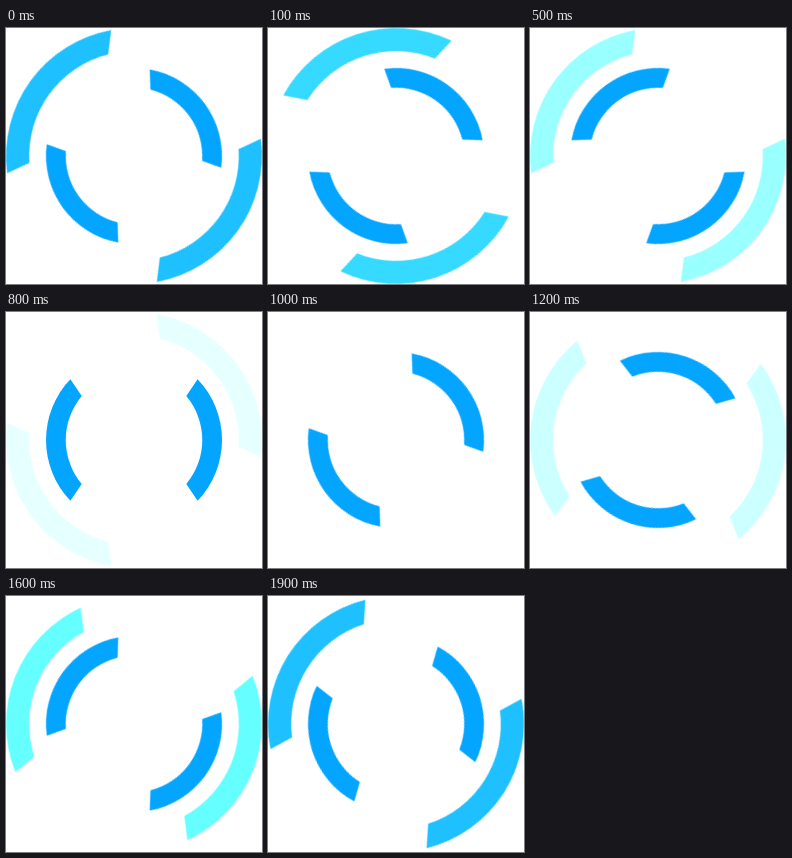
An HTML page without scripts for the animation above (2000 ms loop, 256 px wide and 256 px high).

```html
<!DOCTYPE html>
<html lang="en">
<head>
<meta charset="utf-8">
<title>Loading rings</title>
<style>
  html, body { margin: 0; height: 100%; overflow: hidden; background: #fff; }
  svg { display: block; width: 100%; height: 100%; }

  /* Ten discrete poses per second */
  .outer { animation: whirl 2s infinite, fade 2s infinite; }
  .inner { fill: #04a5ff; animation: spin 2s steps(20) infinite; }

  @keyframes spin {
    from { transform: rotate(-36deg); }
    to   { transform: rotate(-396deg); }
  }

  /* Fast sweep, then a slow drift */
  @keyframes whirl {
    0%   { transform: rotate(36deg); animation-timing-function: steps(9); }
    45%  { transform: rotate(360deg); animation-timing-function: steps(1); }
    50%  { transform: rotate(0deg); animation-timing-function: steps(10); }
    100% { transform: rotate(36deg); }
  }

  /* Brighten to white and back */
  @keyframes fade {
    0%   { fill: #1ec0ff; animation-timing-function: steps(2); }
    10%  { fill: #4df2ff; animation-timing-function: steps(1); }
    15%  { fill: #66ffff; animation-timing-function: steps(6); }
    45%  { fill: #ffffff; animation-timing-function: steps(1); }
    50%  { fill: #ffffff; animation-timing-function: steps(6); }
    80%  { fill: #66ffff; animation-timing-function: steps(1); }
    85%  { fill: #4df2ff; animation-timing-function: steps(2); }
    95%  { fill: #1ec0ff; animation-timing-function: steps(1); }
    100% { fill: #1ec0ff; }
  }
</style>
</head>
<body>
<svg viewBox="-128 -128 256 256">
  <defs>
    <path id="wide" d="M92.5-88.4A128 128 0 0 1 92.5 88.4L80.6 67.1A104.9 104.9 0 0 0 80.6-67.1Z"/>
    <path id="slim" d="M63.6-60.8A88 88 0 0 1 63.6 60.8L52.3 43.9A68.3 68.3 0 0 0 52.3-43.9Z"/>
  </defs>
  <g class="outer">
    <use href="#wide"/>
    <use href="#wide" transform="scale(-1)"/>
  </g>
  <g class="inner">
    <use href="#slim"/>
    <use href="#slim" transform="scale(-1)"/>
  </g>
</svg>
</body>
</html>
```
